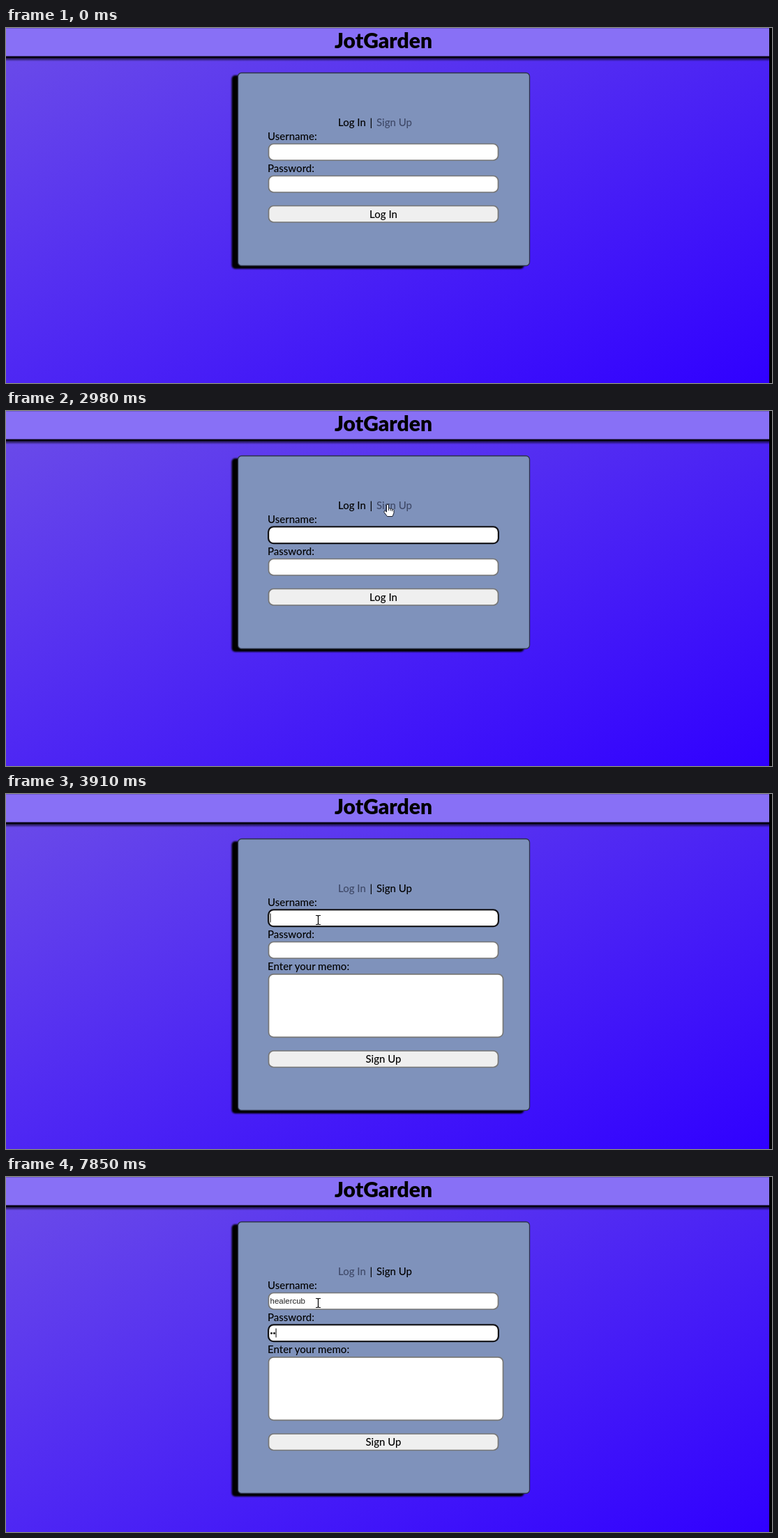
An HTML page that plays this animation: 1098x510 px, repeating every 8 s.

```html
<!DOCTYPE html>
<html lang="en">
<head>
<meta charset="utf-8">
<title>JotGarden</title>
<style>
  html, body { margin: 0; width: 100%; height: 100%; overflow: hidden; background: #000; }
  svg { display: block; width: 1098px; height: 510px;
        background: linear-gradient(to bottom right, #6c4de8, #3000ff) 0 0 / 1094px 510px no-repeat; }
  text { font: 500 15px Lato, sans-serif; }
  .title { font: 900 30px Lato, sans-serif; }
  .typed { font: 11.5px "Liberation Sans", Arial, sans-serif; fill: #222; }
  .mid { text-anchor: middle; }
  .field { fill: #fff; stroke: #767676; stroke-width: 1.7; }
  .ring { fill: none; stroke: #101014; stroke-width: 2; }
</style>
</head>
<body>
<svg viewBox="0 0 1098 510">
  <defs>
    <filter id="soft" x="-10%" y="-10%" width="120%" height="120%"><feGaussianBlur stdDeviation="1"/></filter>
    <linearGradient id="fade" x2="0" y2="1">
      <stop stop-color="#000" stop-opacity=".75"/><stop offset="1" stop-color="#000" stop-opacity="0"/>
    </linearGradient>
  </defs>

  <rect width="1094" height="41" fill="#8870f6"/>
  <rect width="1094" height="1" fill="#6f5bd0"/>
  <rect y="40.5" width="1094" height="2.5" fill="#05000f"/>
  <rect y="43" width="1094" height="5" fill="url(#fade)"/>
  <text class="title mid" x="541" y="29">JotGarden</text>

  <rect id="shade" x="323.5" y="68" width="419" rx="5" filter="url(#soft)"/>
  <rect id="card" x="332.5" y="64.5" width="418" rx="5" fill="#7f92bb" stroke="#2c3348" stroke-width="1.3"/>

  <rect id="mark" x="543" y="125" width="8" height="21" fill="#2368dc"/>
  <text id="logTab" x="476" y="140.5">Log In</text>
  <text x="521.5" y="140.5">|</text>
  <text id="signTab" x="531" y="140.5">Si<tspan id="marked">g</tspan>n Up</text>

  <text x="375" y="160.5">Username:</text>
  <rect class="field" x="376.5" y="166.5" width="329" height="23.5" rx="7"/>
  <rect class="ring" id="userRing" x="376" y="166.3" width="330" height="24" rx="7.5"/>
  <text class="typed" id="user" x="378.5" y="182"></text>

  <text x="375" y="206.5">Password:</text>
  <rect class="field" x="376.5" y="212.5" width="329" height="23.5" rx="7"/>
  <rect class="ring" id="passRing" x="376" y="212.3" width="330" height="24" rx="7.5"/>
  <text class="typed" id="pass" x="378.5" y="228"></text>
  <rect id="caret" width="1" height="13"/>

  <g id="memo">
    <text x="375" y="252.5">Enter your memo:</text>
    <rect class="field" x="376.5" y="258.8" width="336" height="90.5" rx="7"/>
  </g>
  <g id="button">
    <rect class="field" x="376.5" y="255.5" width="329" height="23.5" rx="7" style="fill:#efefef"/>
    <text class="mid" id="action" x="541" y="272.7"></text>
  </g>

  <g id="pointer">
    <path id="arrow" d="M.5 .5V15L4 11.8 6.2 17 8.6 16 6.4 11H11Z" fill="#fff" stroke="#333c50" stroke-width=".9"/>
    <g id="beam" fill="none">
      <path d="M-3.5-6.5h2.5l1 1 1-1h2.5M0-5.5v11M-3.5 6.5h2.5l1-1 1 1h2.5" stroke="#fff" stroke-width="2.4" stroke-opacity=".5"/>
      <path d="M-3.5-6.5h2.5l1 1 1-1h2.5M0-5.5v11M-3.5 6.5h2.5l1-1 1 1h2.5" stroke="#000" stroke-width="1.2"/>
    </g>
    <path id="hand" d="M-1.5 1Q0-1 1.5 1V6Q3 5 4.2 6.5 5.6 5.8 6.6 7.2 8.6 6.6 9 8.6V12.5L7 17.5H-.5L-5 11.5Q-5.5 9-3.3 9.4L-1.5 11ZM1.5 6V9M4.2 6.5V9.5M6.6 7.2V10" fill="#fff" stroke="#151a28" stroke-width="1"/>
  </g>
</svg>
<script>
const LOOP = 8000;
const SWITCH = 3020, REFOCUS = 3690, TAB = 6050;
const NAME = "healercub";
const nameKeys = [4300, 4420, 4600, 4800, 4880, 4960, 5310, 5440, 5670];
const passKeys = [7770, 7850];
const caretOn = [[1450, 1940], [2440, 2940], [REFOCUS, 4190], [4300, 6600], [7160, 7620], [7770, LOOP]];

// time, x, y of the pointer's hot spot
const path = [
  [280, 854, 434], [320, 740, 372], [365, 600, 304], [410, 549, 282], [610, 549, 282],
  [740, 480, 205], [880, 416.5, 139.5], [1060, 416.5, 140], [1450, 424, 171], [2160, 424, 171],
  [2450, 462, 155], [2700, 520, 133], [2850, 545, 122], [2970, 547, 134], [3110, 547, 134],
  [3350, 500, 156], [3600, 452, 180], [3810, 447.5, 181]
];

const $ = id => document.getElementById(id);
const set = (id, name, value) => $(id).setAttribute(name, value);
const show = (id, on) => set(id, "display", on ? "inline" : "none");
const ramp = (t, from, to) => Math.min(1, Math.max(0, (t - from) / (to - from)));
const count = (keys, t) => keys.filter(k => k <= t).length;
const inside = (x, y, l, t, r, b) => x >= l && x <= r && y >= t && y <= b;

function pointerAt(t) {
  const i = path.findIndex(p => p[0] > t);
  if (i < 0) return path[path.length - 1].slice(1);
  const [t0, x0, y0] = path[i - 1], [t1, x1, y1] = path[i];
  const k = ramp(t, t0, t1);
  return [x0 + (x1 - x0) * k, y0 + (y1 - y0) * k];
}

function pointerKind(x, y) {
  if (inside(x, y, 476, 125, 516, 146) || inside(x, y, 531, 125, 580, 146)) return "hand";
  const onText = inside(x, y, 375, 147, 442, 165) || inside(x, y, 375, 194, 438, 211);
  const onField = inside(x, y, 376, 166, 706, 190) || inside(x, y, 376, 212, 706, 236);
  return onText || onField ? "beam" : "arrow";
}

function drawPointer(t) {
  show("pointer", t >= path[0][0]);
  if (t < path[0][0]) return;
  const [x, y] = pointerAt(t), kind = pointerKind(x, y);
  set("pointer", "transform", `translate(${x} ${y})`);
  for (const id of ["arrow", "beam", "hand"]) show(id, id === kind);
}

function draw(t) {
  const signUp = t >= SWITCH, selected = signUp && t < REFOCUS;
  const height = signUp ? 390 : 277;
  set("card", "height", height);
  set("shade", "height", height + 1);
  set("logTab", "fill", signUp ? "#3f4968" : "#000");
  set("signTab", "fill", signUp ? "#000" : "#3f4968");
  show("mark", selected);
  set("marked", "fill", selected ? "#fff" : "inherit");
  show("memo", signUp);
  set("button", "transform", `translate(0 ${signUp ? 113.5 : 0})`);
  $("action").textContent = signUp ? "Sign Up" : "Log In";

  const first = ramp(t, 1450, 1800) - ramp(t, SWITCH, 3370);
  const second = ramp(t, REFOCUS, 3910) - ramp(t, TAB, 6420);
  set("userRing", "opacity", Math.max(first, second));
  set("passRing", "opacity", ramp(t, TAB, 6420));

  $("user").textContent = NAME.slice(0, count(nameKeys, t));
  $("pass").textContent = "•".repeat(count(passKeys, t));
  const active = $(t < TAB ? "user" : "pass");
  show("caret", caretOn.some(([a, b]) => t >= a && t < b));
  set("caret", "x", 378.5 + (active.textContent ? active.getComputedTextLength() : 0));
  set("caret", "y", t < TAB ? 171.5 : 217.5);

  drawPointer(t);
}

const start = performance.now();
function tick() {
  draw((performance.now() - start) % LOOP);
  requestAnimationFrame(tick);
}
tick();
</script>
</body>
</html>
```
